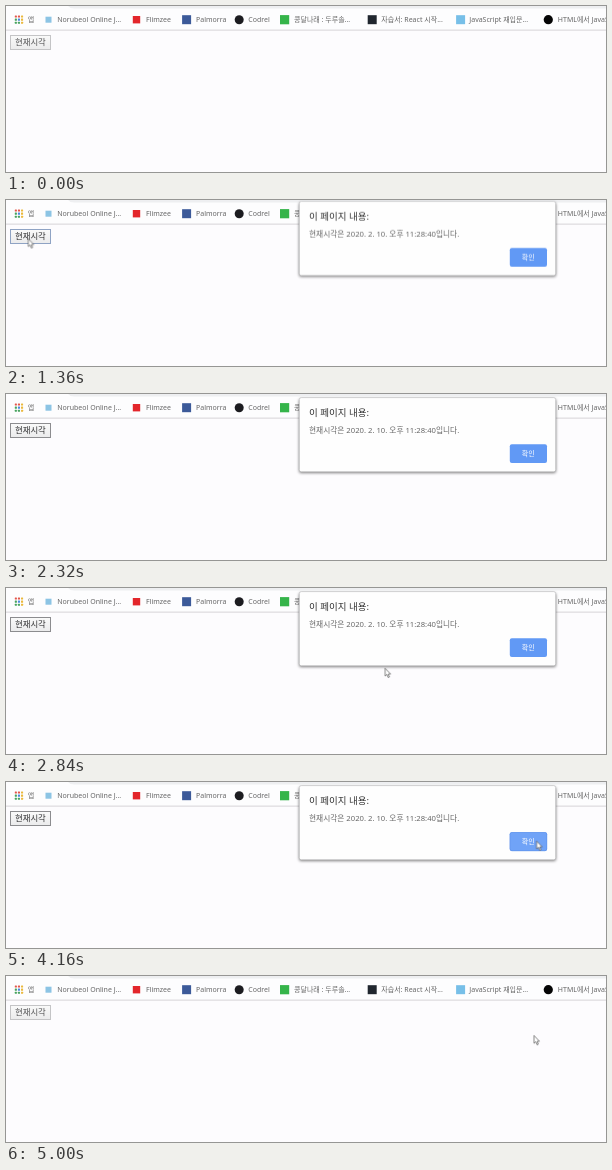
These frames come from a looping animation (600x166 px, 5200 ms). An HTML page:

```html
<!DOCTYPE html>
<html>
<head>
<meta charset="utf-8">
<title>Alert</title>
<style>
html, body { margin: 0; width: 100%; height: 100%; overflow: hidden; background: #fdfcfe; }
svg { display: block; width: 600px; height: 166px; }
text { font-family: "Noto Sans", "Noto Sans CJK KR", sans-serif; }
.bar text { font-size: 7px; fill: #666; }
.dialog, .cursor, .hover { animation: 5200ms linear infinite; }
.edge, .label, .press, .glow { animation: 5200ms step-end infinite; }

.dialog { animation-name: dialog; }
@keyframes dialog {
  0%, 23.4% { transform: translateY(-18px); opacity: 0; animation-timing-function: cubic-bezier(.33, .67, .67, 1); }
  25.4% { transform: translateY(-4.2px); opacity: 1; }
  26.15% { transform: translateY(-2.3px); opacity: 1; }
  27.7%, 81.5% { transform: none; opacity: 1; }
  84.6%, 100% { transform: translateY(-12px); opacity: 0; }
}

.hover { animation-name: hover; }
@keyframes hover {
  0%, 70% { opacity: 0; }
  72.31%, 100% { opacity: 1; }
}

.edge { animation-name: edge; }
@keyframes edge {
  0% { stroke: #c4c4c6; }
  9.23% { stroke: #b4b4b6; }
  17.69% { stroke: #8c8c8f; }
  84.6%, 100% { stroke: #c4c4c6; }
}

.label { animation-name: label; }
@keyframes label {
  0% { fill: #505052; }
  17.69% { fill: #2c2c2e; }
  84.6%, 100% { fill: #505052; }
}

.press { animation-name: press; }
@keyframes press {
  0% { opacity: 0; }
  17.69% { opacity: 1; }
  19.23%, 100% { opacity: 0; }
}

.glow { animation-name: glow; }
@keyframes glow {
  0% { opacity: 0; }
  17.69% { opacity: 1; }
  29.2%, 100% { opacity: 0; }
}

.cursor { animation-name: move, show; animation-timing-function: linear, step-end; }
@keyframes move {
  0%, .77% { transform: translate(38px, 164px); animation-timing-function: ease-out; }
  10%, 27.7% { transform: translate(22.3px, 38.5px); animation-timing-function: ease-in; }
  33.85% { transform: translate(151px, 116px); }
  38.46% { transform: translate(290px, 137px); }
  41.54% { transform: translate(494px, 88px); }
  44.62%, 48.46% { transform: translate(430px, 36px); }
  51.92% { transform: translate(298px, 20px); }
  55% { transform: translate(390px, 88px); }
  58.46% { transform: translate(488px, 62px); }
  60% { transform: translate(512px, 60px); }
  62.31% { transform: translate(534.3px, 65.5px); }
  65.38% { transform: translate(539px, 69px); }
  67.7% { transform: translate(527px, 52px); }
  69.23% { transform: translate(531px, 57px); }
  72.31%, 74.6% { transform: translate(533px, 58px); }
  75.38%, 82.3% { transform: translate(530.6px, 58.8px); }
  87.69%, 100% { transform: translate(528px, 59.2px); }
}
@keyframes show {
  0% { opacity: 0; }
  .76% { opacity: 1; }
  43.8% { opacity: 0; }
  49.2%, 100% { opacity: 1; }
}
</style>
</head>
<body>
<svg viewBox="0 0 600 166">
  <defs>
    <linearGradient id="face" x2="0" y2="1">
      <stop stop-color="#fafafa"/>
      <stop offset="1" stop-color="#ebebec"/>
    </linearGradient>
    <filter id="soft" x="-10%" y="-20%" width="120%" height="150%">
      <feGaussianBlur stdDeviation="1.6"/>
    </filter>
  </defs>

  <g class="bar">
    <rect width="600" height="24" fill="#fdfdfe"/>
    <path d="M62 0H600V2.6H68Q64 2.6 62 0Z" fill="#eeeff1"/>
    <rect y="23.6" width="600" height="1" fill="#d6d4d8"/>
    <g id="apps"></g>
    <text x="21.7" y="16">앱</text>
    <g id="links"></g>
  </g>

  <rect class="edge" x="4.5" y="29.5" width="40" height="14" fill="url(#face)"/>
  <rect class="press" x="5" y="30" width="39" height="13" fill="#dcdcde"/>
  <rect class="glow" x="4.5" y="29.5" width="40" height="14" fill="none" stroke="#8fa3c4"/>
  <text class="label" x="9" y="39.2" font-size="8.4">현재시각</text>

  <g class="dialog">
    <rect x="293" y="5" width="257" height="74" rx="2" fill="#000" opacity=".5" filter="url(#soft)"/>
    <rect x="293.3" y="3.6" width="256.4" height="74.2" rx="2" fill="#fefefe" stroke="#b5b5b8" stroke-width=".6"/>
    <text x="303" y="22.3" font-size="9.5" fill="#333">이 페이지 내용:</text>
    <text x="303" y="38.9" font-size="7.7" fill="#666">현재시각은 2020. 2. 10. 오후 11:28:40입니다.</text>
    <rect x="503.8" y="50.2" width="37.2" height="18.8" rx="2" fill="#6199f5"/>
    <rect class="hover" x="504" y="50.4" width="36.8" height="18.4" rx="2" fill="#70a3f7" stroke="#5e93ea" stroke-width=".6"/>
    <text x="515.8" y="62.2" font-size="7.1" fill="#fff">확인</text>
  </g>

  <g class="cursor">
    <path d="M0 .3V8.1L1.8 6.5L3.1 9.6L4.4 9L3.1 6.1H5.5Z" fill="#fff" stroke="#555" stroke-width=".7"/>
  </g>
</svg>
<script>
const make = (parent, tag, attrs, label) => {
  const el = document.createElementNS('http://www.w3.org/2000/svg', tag);
  for (const key in attrs) el.setAttribute(key, attrs[key]);
  if (label) el.textContent = label;
  document.getElementById(parent).append(el);
};

const dots = ['#e2554a', '#e2554a', '#eab83c', '#46a35e', '#4b87e0', '#eab83c', '#46a35e', '#46a35e', '#eab83c'];
dots.forEach((fill, i) => make('apps', 'rect', {
  x: 8.8 + (i % 3) * 3.1, y: 9.5 + Math.floor(i / 3) * 3.1, width: 2.1, height: 2.1, rx: .5, fill
}));

// icon centre, icon size, text x, colour, label, round
const links = [
  [42.5, 6, 51.3, '#8cc4e4', 'Norubeol Online J...'],
  [130.5, 7.4, 140, '#e3262b', 'Flimzee'],
  [180.6, 9, 190, '#3c5a99', 'Palmorra'],
  [233.2, 9, 242.3, '#1c1c20', 'Codrel', true],
  [278.6, 9.2, 288, '#35b44a', '콩달나래 : 두루솔...'],
  [366.2, 9, 375.3, '#20262e', '자습서: React 시작...'],
  [454.6, 9, 463.3, '#77bfe8', 'JavaScript 재입문...'],
  [542.3, 9.2, 551.8, '#050505', 'HTML에서 JavaScript', true]
];
for (const [cx, size, tx, fill, label, round] of links) {
  make('links', 'rect', {
    x: cx - size / 2, y: 13.7 - size / 2, width: size, height: size, rx: round ? size / 2 : 0, fill
  });
  make('links', 'text', { x: tx, y: 16 }, label);
}
</script>
</body>
</html>
```
